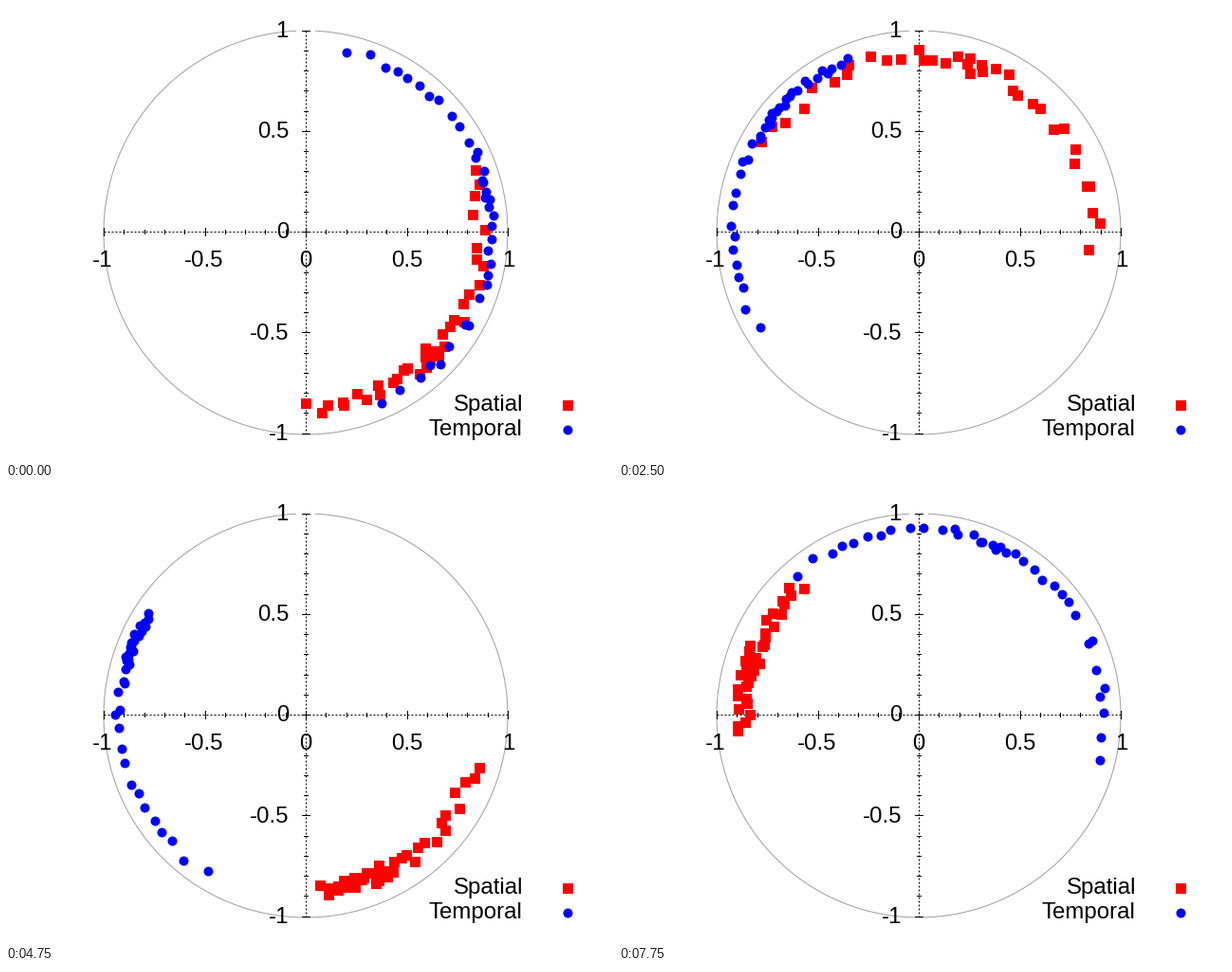
Animation, 640 px wide and 480 px high, one loop 8000 ms. Source, as a matplotlib script:

```python
import numpy as np
import matplotlib.pyplot as plt
from matplotlib.animation import FuncAnimation

W, H, DPI = 640, 480, 80
PX = 72 / DPI                      # points per pixel
CX, CY, R = 316, 239, 213
AXIS_Y = 238
FRAMES, STEP_MS = 32, 250
COUNT = 36
RED, BLUE = "#ff0000", "#0000ff"

# Key poses: frame, centre angle, reach below and above it (degrees)
SPATIAL = [
    (0, -44, 46, 64),
    (5, 123, 57, 45),
    (10, 432, 78, 78),
    (15, 723, 70, 47),
    (19, 1016, 21, 47),
    (24, 1318, 45, 142),
    (31, 1602, 30, 23),
]
TEMPORAL = [
    (0, 10, 76, 67),
    (5, -292, 18, 20),
    (10, -577, 31, 68),
    (15, -992, 68, 73),
    (19, -1277, 16, 75),
    (24, -1654, 46, 89),
    (28, -1945, 15, 15),
    (31, -2096, 78, 67),
]


class Swarm:
    """Points on a ring: dense round a moving centre, thinner at both ends."""

    def __init__(self, keys, radius, jitter, seed):
        rng = np.random.default_rng(seed)
        self.keys = np.array(keys).T
        rank = np.linspace(-1, 1, COUNT)
        rank[1:-1] += rng.uniform(-0.03, 0.03, COUNT - 2)
        self.offset = np.sign(rank) * np.abs(rank) ** 1.4
        self.radius = radius + jitter * rng.uniform(-1, 1, COUNT)

    def at(self, frame):
        times, *tracks = self.keys
        centre, below, above = (np.interp(frame, times, t) for t in tracks)
        reach = np.where(self.offset < 0, below, above)
        angle = np.radians(centre + reach * self.offset)
        x = CX + R * self.radius * np.cos(angle)
        y = CY - R * self.radius * np.sin(angle)
        return np.floor(x), np.floor(y)


fig = plt.figure(figsize=(W / DPI, H / DPI), dpi=DPI, facecolor="white")
ax = fig.add_axes([0, 0, 1, 1])
ax.set_xlim(0, W)
ax.set_ylim(H, 0)
ax.axis("off")


def line(x, y, color="black", style="-"):
    ax.plot(x, y, color=color, lw=PX, ls=style, zorder=1)


def label(x, baseline, text, ha):
    ax.text(x, baseline, text, ha=ha, va="baseline", family="Liberation Sans",
            fontsize=24 * PX, color="black", zorder=2)


def markers(color, shape, size, x=(), y=()):
    return ax.plot(x, y, ls="", marker=shape, ms=size * PX, mew=0,
                   color=color, zorder=3)[0]


# Outer circle, open at the top
arc = np.radians(np.linspace(92.8, 447.2, 400))
line(CX + R * np.cos(arc), CY - R * np.sin(arc), color="#a0a0a0")

# Dotted axes with ticks; whole pixels keep the lines crisp
dots = (0, (2, 2))
line([CX - R, CX + R], [AXIS_Y, AXIS_Y], style=dots)
line([CX, CX], [CY - R, CY + R - 1], style=dots)
for i in range(-10, 11):
    half = 2 if i % 5 else 4
    x = np.floor(CX + R * i / 10 + 0.5)
    y = np.floor(AXIS_Y - (R - 0.5) * i / 10 + 0.5)
    line([x, x], [AXIS_Y - half, AXIS_Y + half])
    line([CX - half, CX + half], [y, y])

for i, text in enumerate(["-1", "-0.5", "0", "0.5", "1"]):
    label(101.7 + 107 * i, 275, text, "center")
    label(298, 458 - 106.3 * i, text, "right")

# Legend
label(545, 427.5, "Spatial", "right")
label(544, 453.5, "Temporal", "right")
markers(RED, "s", 11, [592], [421])
markers(BLUE, "o", 10, [592], [447])

swarms = [Swarm(SPATIAL, 0.865, 0.04, 4), Swarm(TEMPORAL, 0.922, 0.018, 7)]
clouds = [markers(RED, "s", 11), markers(BLUE, "o", 10)]


def draw(frame):
    for cloud, swarm in zip(clouds, swarms):
        cloud.set_data(*swarm.at(frame))
    return clouds


anim = FuncAnimation(fig, draw, frames=FRAMES, interval=STEP_MS,
                     repeat=True, repeat_delay=0)
plt.show()
```
